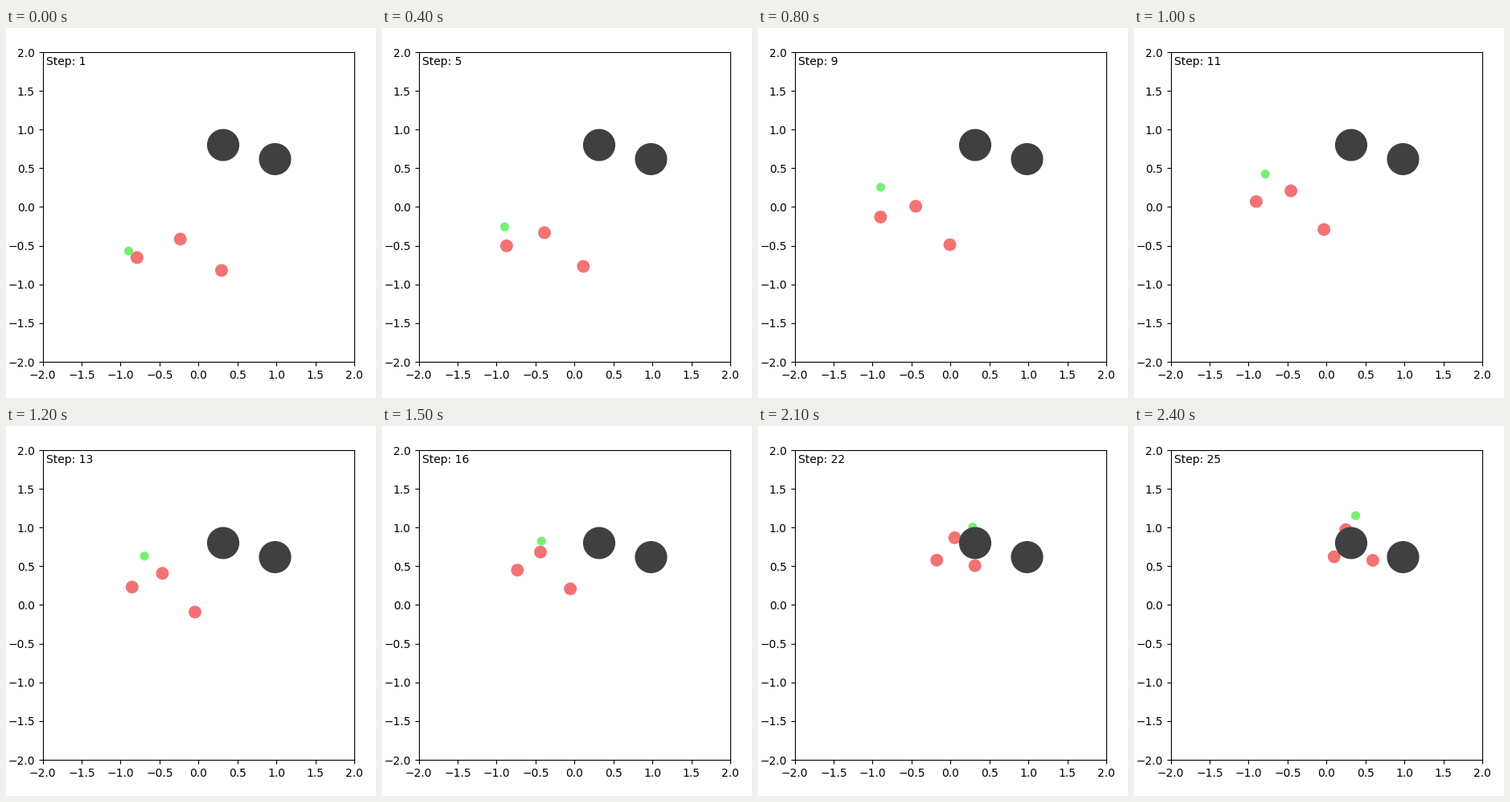
These frames come from a looping animation (460 by 460 pixels, 2500 ms). A matplotlib script:

```python
import numpy as np
import matplotlib.pyplot as plt
from matplotlib.animation import FuncAnimation
from matplotlib.patches import Circle

SIZE, DPI = 460, 100
STEPS, INTERVAL = 25, 100
DT, DAMPING = 0.1, 0.25
CONTACT, MARGIN = 50, 1e-3

RED, GREEN, DARK = (0.95, 0.45, 0.45), (0.45, 0.95, 0.45), (0.25,) * 3
MOVES = {"L": (-1, 0), "R": (1, 0), "U": (0, 1), "D": (0, -1)}
ROCKS = np.array([(0.317, 0.80), (0.983, 0.618)])
ROCK_R = 0.2

# start, radius, colour, acceleration, top speed, one action per step
AGENTS = [
    ((-0.789, -0.654), 0.075, RED, 3, 1.0, "LUUU" + "U" * 6 + "RUU" + "R" * 10 + "U"),
    ((-0.233, -0.415), 0.075, RED, 3, 1.0, "LL" + "U" * 12 + "R" * 10),
    ((0.296, -0.820), 0.075, RED, 3, 1.0, "LLUL" + "U" * 11 + "RRRRURRRR"),
    ((-0.895, -0.569), 0.05, GREEN, 4, 1.3, "U" * 8 + "RRUU" + "R" * 8 + "ULRD"),
]


def push(pos, radius):
    """Soft contact force from the rocks."""
    delta = pos - ROCKS
    dist = np.hypot(*delta.T)
    depth = np.logaddexp(0, (radius + ROCK_R - dist) / MARGIN) * MARGIN
    return (CONTACT * delta * (depth / dist)[:, None]).sum(axis=0)


def simulate(start, radius, accel, top, actions):
    pos, vel = np.array(start), np.zeros(2)
    path = [pos]
    for a in actions:
        force = accel * np.array(MOVES[a]) + push(pos, radius)
        vel = vel * (1 - DAMPING) + force * DT
        speed = np.hypot(*vel)
        if speed > top:
            vel = vel * top / speed
        pos = pos + vel * DT
        path.append(pos)
    return path


side = (SIZE + 0.01) / DPI  # guards against rounding down a pixel
fig = plt.figure(figsize=(side, side), dpi=DPI, facecolor="white")
ax = fig.add_axes([45.52 / SIZE, 45 / SIZE, 387.5 / SIZE, 385 / SIZE])
ax.set_xlim(-2, 2)
ax.set_ylim(-2, 2)
ticks = np.arange(-2, 2.1, 0.5)
ax.set_xticks(ticks)
ax.set_yticks(ticks)

dots, paths = [], []
for start, radius, color, accel, top, actions in AGENTS:
    dots.append(ax.add_patch(Circle(start, radius, color=color)))
    paths.append(simulate(start, radius, accel, top, actions))
for rock in ROCKS:
    ax.add_patch(Circle(rock, ROCK_R, color=DARK))
label = ax.text(-1.95, 1.95, "", va="top", fontsize=10)


def update(i):
    for dot, path in zip(dots, paths):
        dot.center = path[i]
    label.set_text(f"Step: {i + 1}")
    return [*dots, label]


anim = FuncAnimation(fig, update, frames=STEPS, interval=INTERVAL,
                     repeat=True, repeat_delay=0)
plt.show()
```
